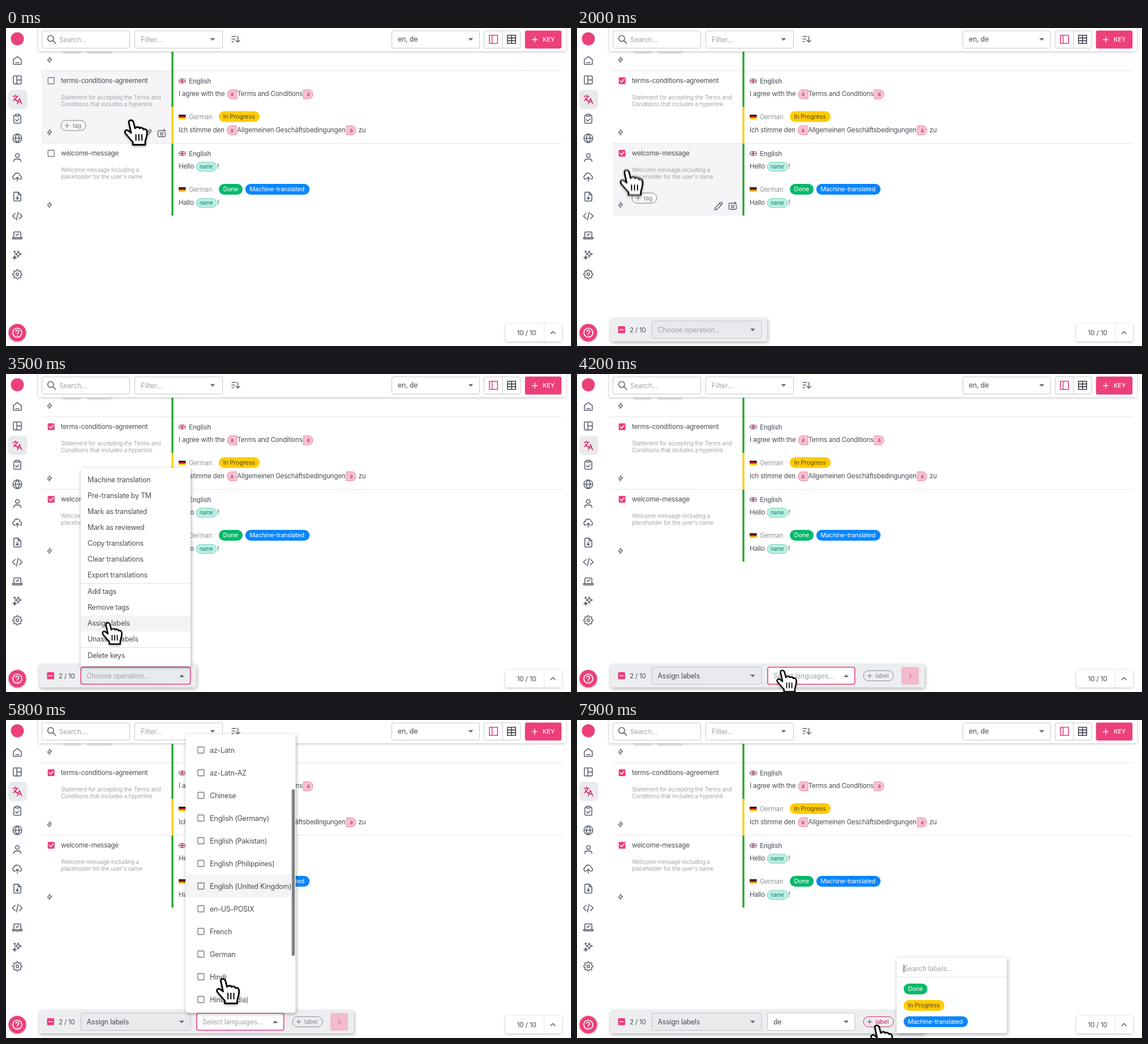
Recreate the animation shown at these times as an HTML page. Size 998 by 561 pixels, loop 8 s.

```html
<!DOCTYPE html>
<html lang="en">
<head>
<meta charset="utf-8">
<title>Assigning labels to translations</title>
<style>
  html, body { margin: 0; width: 100%; height: 100%; overflow: hidden; background: #fff; }
  svg { display: block; width: 998px; height: 561px; }
  text { font-family: Inter, "Liberation Sans", sans-serif; letter-spacing: -.018em; white-space: pre; }
  .paper { filter: drop-shadow(1px 2px 3px rgba(0,0,0,.33)); }
  .soft { filter: drop-shadow(0 1px 2px rgba(0,0,0,.25)); }
  .pointer { filter: drop-shadow(0 2px 2px rgba(0,0,0,.25)); }
</style>
</head>
<body>
<svg id="stage" viewBox="0 0 998 561"></svg>
<script>
const LOOP = 8000, STEP = 100;
const PINK = '#ec407a', INK = '#4a4d55', ICON = '#596070', FAINT = '#a1a4ab', EDGE = '#c4c6cb';

const clamp = v => Math.max(0, Math.min(1, v));
const ramp = (t, a, b) => clamp((t - a) / (b - a));
const ease = v => v * v * (3 - 2 * v);

// Drawing helpers; text is centred vertically on y.
const text = (x, y, s, size = 12.48, fill = INK, weight = 400) =>
  `<text x="${x}" y="${y + size * .36}" font-size="${size}" fill="${fill}" font-weight="${weight}">${s}</text>`;
const rect = (x, y, w, h, fill, r = 0, stroke = 'none', sw = 1) =>
  `<rect x="${x}" y="${y}" width="${w}" height="${h}" rx="${r}" fill="${fill}" stroke="${stroke}" stroke-width="${sw}"/>`;
const path = (d, stroke, sw = 1, fill = 'none') =>
  `<path d="${d}" fill="${fill}" stroke="${stroke}" stroke-width="${sw}" stroke-linecap="round" stroke-linejoin="round"/>`;
const at = (x, y, s, k = 1) => `<g transform="translate(${x} ${y}) scale(${k})">${s}</g>`;
const fade = (o, s) => o > 0 ? `<g opacity="${o}">${s}</g>` : '';
const group = (cls, s) => `<g class="${cls}">${s}</g>`;
// Icons are drawn on a 24 unit grid.
const icon = (x, y, d, color = ICON, k = .78, sw = 2) =>
  at(x, y, `<g transform="translate(-12 -12)">${path(d, color, sw)}</g>`, k);
const ring = (x, y, r) => `M${x - r} ${y}a${r} ${r} 0 1 0 ${2 * r} 0a${r} ${r} 0 1 0 ${-2 * r} 0`;
const caret = (x, y, up) => at(x, y, path('M-3.5-1.7h7L0 1.8z', '#62666f', .8, '#62666f'), up ? -1 : 1);
const plus = (x, y, r, color, sw = 1.2) => path(`M${x - r} ${y}h${2 * r}M${x} ${y - r}v${2 * r}`, color, sw);

const gear = (() => {
  let d = '';
  for (let i = 0; i < 72; i++) {
    const a = i * Math.PI / 36, r = 9.2 + 1.4 * Math.cos(8 * a);
    d += `${i ? 'L' : 'M'}${(12 + r * Math.cos(a)).toFixed(1)} ${(12 + r * Math.sin(a)).toFixed(1)}`;
  }
  return d + 'Z' + ring(12, 12, 3);
})();
const bolt = 'M13 3L5 14h6l-1 7 9-11h-6z';
const pencil = 'M3 21l1-5L16 4a2.800 2.800 0 0 1 4 4L8 20zM14 6l4 4';
const camera = 'M14 5H5a2 2 0 0 0-2 2v11a2 2 0 0 0 2 2h14a2 2 0 0 0 2-2v-8M18 2v6M15 5h6' + ring(12, 13, 3.2);
const grid = 'M3 3h18v18H3zM3 9h18M3 15h18M12 3v18';

const sideIcons = [
  'M3 10l9-7 9 7v10a1 1 0 0 1-1 1H4a1 1 0 0 1-1-1zM8 17h8',
  'M5 3h14a2 2 0 0 1 2 2v14a2 2 0 0 1-2 2H5a2 2 0 0 1-2-2V5a2 2 0 0 1 2-2zM11 3v18M11 12h10',
  'M2 5h12M8 2v3M11 5c-1 5-4 8-8 10M5 9c2 4 5 6 8 7M12 22l5-12 5 12M14 18h6',
  'M8 4H6a2 2 0 0 0-2 2v14a2 2 0 0 0 2 2h12a2 2 0 0 0 2-2V6a2 2 0 0 0-2-2h-2M8 2h8v4H8zM8 14l3 3 5-5',
  ring(12, 12, 10) + 'M2 12h20M12 2c6 6 6 14 0 20M12 2c-6 6-6 14 0 20',
  ring(12, 7, 4.3) + 'M4 21v-1c0-3 2-5 5-5h6c3 0 5 2 5 5v1',
  'M6 17a5 5 0 0 1-1-9.500a7 7 0 0 1 13.500 1a4.500 4.500 0 0 1 0 8.500M8 16l4-4 4 4M12 12v9',
  'M14 2H6a2 2 0 0 0-2 2v16a2 2 0 0 0 2 2h12a2 2 0 0 0 2-2V8zM14 2v6h6M12 11v7M9 15l3 3 3-3',
  'M7 6l-6 6 6 6M17 6l6 6-6 6M14 3l-4 18',
  'M4 17V6a2 2 0 0 1 2-2h12a2 2 0 0 1 2 2v11M1 17h22v1a2 2 0 0 1-2 2H3a2 2 0 0 1-2-2zM9 10l2 2 4-4',
  'M14 3l2 5 5 2-5 2-2 5-2-5-5-2 5-2zM6 14l1 3 3 1-3 1-1 3-1-3-3-1 3-1zM4 5h4M6 3v4',
  gear
];

function check(x, y, on) {
  return on
    ? rect(x - 6, y - 6, 12, 12, PINK, 1.5) + path(`M${x - 3.3} ${y}l2.500 2.600 4.400-5`, '#fff', 1.5)
    : rect(x - 5.5, y - 5.5, 11, 11, 'none', 1, '#737781', 1.3);
}
const pill = (x, y, w, fill, s, color = '#fff') =>
  rect(x, y - 9.5, w, 19, fill, 9.5) + text(x + 7.5, y, s, 10.9, color);
const chip = (x, y, w, s, color, size) =>
  rect(x, y - 9, w, 18, 'none', 9, color) + plus(x + 11, y, 4, color) + text(x + 21, y, s, size, color);
const done = (x, y) => pill(x, y, 42, '#04b96a', 'Done');
const progress = (x, y) => pill(x, y, 72, '#ffcb05', 'In Progress', '#5a4a10');
const machine = (x, y) => pill(x, y, 113.5, '#0b86fb', 'Machine-translated');

function sidebar() {
  return rect(4, 109, 33.5, 34, '#e9eaed', 7)
    + sideIcons.map((d, i) => icon(20, 57.3 + 34.3 * i, d, i === 2 ? '#d5265f' : ICON)).join('')
    + `<circle cx="20" cy="19" r="11.5" fill="${PINK}"/>`
    + group('soft', `<circle cx="20" cy="537.500" r="15.500" fill="${PINK}"/>`)
    + icon(20, 537.5, ring(12, 12, 9.5) + 'M9 9.500a3 3 0 1 1 4 3c-.7.300-1 .8-1 1.500M12 17v.1', '#fff', .84);
}

function header() {
  const box = (x, w) => rect(x, 5, w, 30.5, '#fff', 3, EDGE);
  return group('soft', rect(57, -5, 932, 46, '#fff'))
    + box(63.5, 155) + icon(80.5, 20, ring(10, 10, 6.5) + 'M15 15l6 6', ICON, .8)
    + text(94, 20.5, 'Search...', 12, FAINT)
    + box(227.5, 155) + text(238, 20.5, 'Filter...', 12.48, FAINT) + caret(365, 20)
    + path('M399 15h7M399 19.500h5M399 24h3M409.500 14.500v10M406 21.500l3.500 3.500 3.500-3.500', ICON, 1.5)
    + box(681.5, 155) + text(692, 20, 'en, de') + caret(821, 20)
    + box(844.5, 64.5) + path('M877 5v30', EDGE)
    + icon(861, 20, 'M3 3h18v18H3zM9 3v18', PINK, .8) + icon(893, 20, grid, '#3f434c', .8)
    + rect(916.7, 4.6, 64.5, 31.7, PINK, 3) + plus(934, 20.5, 4.5, '#fff', 1.4) + text(948, 20.5, 'KEY', 10.9, '#fff', 500);
}

const blade = (x, y, w, left) => {
  const r = 7, d = left
    ? `M${x + r} ${y - 8}h${w - r}v16h${r - w}a${r} 8 0 0 1 0-16z`
    : `M${x} ${y - 8}h${w - r}a${r} 8 0 0 1 0 16h${r - w}z`;
  return path(d, '#e28ba9', 1, '#f9bfd3') + text(x + 5.7, y, 'a', 9.4, '#8c3354');
};
const param = y => rect(336, y - 8, 36, 16, '#baf0e4', 8, '#72d1be') + text(342, y, 'name', 9.3, '#1d7a6b');
const british = y => at(305, y - 4, rect(0, 0, 12.5, 8, '#29397c')
  + `<path d="M0 0l12.500 8M0 8L12.500 0" stroke="#fff" stroke-width="1.800"/>`
  + `<path d="M6.250 0v8M0 4h12.500" stroke="#fff" stroke-width="3"/>`
  + `<path d="M6.250 0v8M0 4h12.500" stroke="#d3213a" stroke-width="1.600"/>`);
const german = y => ['#111', '#dd1111', '#ffce00'].map((c, i) => rect(305, y - 4 + 2.7 * i, 12.5, 2.8, c)).join('');
const english = y => british(y) + text(323, y, 'English', 11.5, '#72767f', 600);
const deutsch = y => german(y) + text(323, y, 'German', 11.3, '#8f939b');

function keyCell(y, name, lines, checked, hover) {
  return fade(hover, rect(63, y, 229, 127, '#f5f5f8')
      + chip(97, y + 96, 44, 'tag', '#7c8089', 10.3)
      + icon(250, y + 110, pencil, ICON, .74) + icon(275, y + 110, camera, ICON, .72))
    + check(79.7, y + 17, checked) + text(97, y + 16.5, name, 11.7)
    + lines.map((s, i) => text(97, y + 46 + 12.2 * i, s, 9.95, FAINT)).join('')
    + icon(77, y + 108, bolt, ICON, .55);
}

function rows(t) {
  const leave = 1 - ramp(t, 1200, 1400);
  const next = ramp(t, 1150, 1400) * (1 - ramp(t, 2000, 2200));
  const line = 11.6;
  return rect(98, 30, 36, 16, '#e8e9eb', 8) + rect(140, 30, 49, 16, '#e8e9eb', 8)
    + icon(77, 56, bolt, ICON, .55)
    + keyCell(76, 'terms-conditions-agreement',
        ['Statement for accepting the Terms and', 'Conditions that includes a hyperlink'], t >= 700, leave)
    + keyCell(204, 'welcome-message',
        ['Welcome message including a', 'placeholder for the user\'s name'], t >= 1600, next)
    + path('M63 75.500H982M63 203.500H982', '#e4e5e8')
    + rect(292.3, 42, 3.3, 97.5, '#25a32e') + rect(292.3, 139.5, 3.3, 64, '#ffcb05') + rect(292.3, 204, 3.3, 127, '#25a32e')
    + english(93.5) + text(305, 116, 'I agree with the', line) + blade(391, 117, 17, true)
    + text(408.5, 116, 'Terms and Conditions', line) + blade(525.5, 117, 16.5, false)
    + deutsch(157) + progress(376, 156.3)
    + text(305, 179.7, 'Ich stimme den', line) + blade(390.5, 180.5, 16.5, true)
    + text(408, 179.7, 'Allgemeinen Geschäftsbedingungen', line) + blade(601.5, 180.5, 16.5, false)
    + text(622.5, 179.7, 'zu', line)
    + english(221.5) + text(305, 244, 'Hello', line) + param(244.7) + text(373, 244, '!', line)
    + deutsch(285) + done(376, 284.5) + machine(422.7, 284.5)
    + text(305, 308, 'Hallo', line) + param(308.7) + text(373, 308, '!', line);
}

const counter = group('soft', rect(882, 522, 100, 31, '#fff', 3))
  + path('M950.500 522v31', '#e3e4e7') + text(902.5, 537.5, '10 / 10', 11.9)
  + path('M962 539.500l4-4 4 4', ICON, 1.5);

function select(x, w, s, placeholder, active, up, fill) {
  const sw = active ? 1.6 : 1;
  return rect(x + sw / 2, 516.5 + sw / 2, w - sw, 31.5 - sw, fill, 3, active ? PINK : '#bfc2c9', sw)
    + text(x + 11, 532.5, s, 12.4, placeholder ? FAINT : INK) + caret(x + w - 16, 532.5, up);
}

function bottomBar(t) {
  const two = t >= 1600, wide = t >= 3600, picking = t >= 4200 && t < 7200;
  const x = two ? 131.5 : 129.5, opOpen = t >= 2700 && t < 3600, chosen = t >= 6300;
  let s = group('paper', rect(59, 512.5, wide ? 555 : two ? 277 : 275, 40.5, '#eceef1', 3))
    + rect(72.5, 526, 12.5, 12.5, PINK, 1.5) + path('M75.700 532.300h6', '#fff', 1.5)
    + text(93, 532.5, (two ? 2 : 1) + ' / 10', 11.7)
    + select(x, 195, wide ? 'Assign labels' : 'Choose operation...', !wide, opOpen, opOpen, '#e8eaed');
  if (wide) s += select(336, 155.5, chosen ? 'de' : 'Select languages...', !chosen, picking, picking && !chosen, '#fff')
    + chip(506, 532.3, 53, 'label', t >= 7300 ? '#d5265f' : '#858992', 10.9)
    + rect(573, 517, 31, 31, '#f3b9cc', 3) + path('M587 528.500l3.800 3.800-3.800 3.800', '#d9779b', 1.3);
  return fade(ramp(t, 700, 900), s);
}

const operations = ['Machine translation', 'Pre-translate by TM', 'Mark as translated', 'Mark as reviewed',
  'Copy translations', 'Clear translations', 'Export translations', 'Add tags', 'Remove tags',
  'Assign labels', 'Unassign labels', 'Delete keys'];

function operationMenu(t, [, cy]) {
  const items = operations.map((s, i) => {
    const y = 187 + 28 * i + (i > 6) + (i > 10);
    return (Math.abs(cy - y) < 14 ? rect(132, y - 14, 194, 28, '#f2f3f5') : '') + text(144, y, s);
  }).join('');
  return fade(ramp(t, 2650, 2800) * (1 - ramp(t, 3500, 3650)),
    group('paper', rect(132, 166, 194, 349.5, '#fff', 2)) + items + path('M132 369.500h194M132 482.500h194', '#dfe0e3'));
}

const languages = ['Afrikaans', 'Albanian', 'Arabic', 'Azerbaijani', 'az-Latn', 'az-Latn-AZ', 'Chinese',
  'English (Germany)', 'English (Pakistan)', 'English (Philippines)', 'English (United Kingdom)', 'en-US-POSIX',
  'French', 'German', 'Hindi', 'Hindi (India)', 'Italian', 'Japanese', 'Polish', 'Spanish'];

function languageMenu(t, [cx, cy]) {
  const scroll = 158 * ease(ramp(t, 5000, 5600));
  // The hovered row only changes when the pointer moves, not while the list scrolls.
  const inside = cx < 511 && cy < 517;
  const hover = inside ? Math.round((cy - 51 + (t < 5850 ? 0 : scroll)) / 40) : -1;
  const items = languages.map((s, i) => {
    const y = 51 + 40 * i - scroll, on = s === 'German' && t >= 6300;
    const fill = on ? '#fdebf1' : i === hover ? '#f4f4f6' : '';
    return (fill ? rect(317, y - 20, 194, 40, fill) : '') + check(344.3, y, on) + text(360, y + .3, s);
  }).join('');
  const bar = ramp(t, 4900, 5100) * (1 - ramp(t, 6300, 6600));
  return fade(ramp(t, 4200, 4400) * (1 - ramp(t, 7100, 7300)),
    group('paper', rect(317, 25, 194.5, 491.5, '#fff', 3))
    + `<clipPath id="list">${rect(317, 25, 194.5, 491.5, '#fff', 3)}</clipPath><g clip-path="url(#list)">${items}</g>`
    + fade(bar, rect(504, 26, 7, 489, '#fff') + rect(504.7, 26.5 + scroll * .605, 5.5, 294, '#808080', 2.7)));
}

function labelPopover(t) {
  return fade(ramp(t, 7650, 7800),
    group('paper', rect(564.5, 419, 195, 133.5, '#fff', 3)) + path('M564.500 453.500h195', '#e3e4e7')
    + path('M577.300 432v13', '#333') + text(577, 438.8, 'Search labels...', 12.48, FAINT)
    + done(577, 474.5) + progress(577, 503.5) + machine(577, 532.3));
}

// Pointer: [time, x, y] stops, shapes by start time, and click times.
const stops = [[100, 221, 164], [600, 81, 94], [1000, 81, 94], [1400, 81, 230], [1900, 81, 230], [2500, 173.5, 533],
  [2950, 173.5, 533], [3350, 180, 440], [3650, 180, 440], [4050, 363, 524], [4500, 363, 524], [4900, 383.5, 458],
  [5850, 383.5, 458], [6100, 385, 413], [6500, 385, 413], [6950, 529, 541], [7900, 530, 540]];
const shapes = [[0, 'hand'], [2100, 'arrow'], [2500, 'beam'], [3000, 'hand'], [3700, 'arrow'], [4000, 'hand'],
  [6700, 'arrow'], [7200, 'hand']];
const clicks = [700, 1600, 2650, 3500, 4200, 6250, 7150, 7750];

function position(t) {
  const i = stops.findIndex(s => s[0] > t);
  if (i < 1) return (i ? stops[stops.length - 1] : stops[0]).slice(1);
  const [a, x, y] = stops[i - 1], [b, u, v] = stops[i], k = ease(ramp(t, a, b));
  return [x + (u - x) * k, y + (v - y) * k];
}

const beam = 'M-9-18c5 0 9 1 9 5c0-4 4-5 9-5M0-13V13M-9 18c5 0 9-1 9-5c0 4 4 5 9 5M-5 0H5';
const pointers = {
  hand: path('M-4 3C-5-2 2-3 4 2L7 13C9 10 14 10 15 13C17 11 21 12 22 15C25 13 28 16 28 19C29 26 26 31 25 36V42H3V37'
      + 'C-2 32-6 27-10 22C-13 18-8 14-4 18L0 21Z', '#000', 2.8, '#fff')
    + path('M8.500 24v10M13.700 24v10M19 24v10', '#000', 2),
  arrow: path('M0 0V26L6 20.500 10.500 31 15 29 10.500 18.500H19Z', '#fff', 2, '#000'),
  beam: path(beam, '#fff', 7) + path(beam, '#000', 3.4)
};

function pointer(t, [x, y]) {
  const shape = shapes.filter(s => s[0] <= t).pop()[1];
  const press = Math.max(...clicks.map(c => clamp(1 - Math.abs(t - c) / 250)));
  const [ax, ay] = position(t - 50), [bx, by] = position(t + 50);
  const blur = [bx - ax, by - ay].map(v => Math.abs(v) * .03);
  const body = at(x, y, pointers[shape], 1 - .13 * press);
  const still = blur[0] + blur[1] < .2;
  return `<filter id="blur" x="-50%" y="-50%" width="200%" height="200%"><feGaussianBlur stdDeviation="${blur.join(' ')}"/></filter>`
    + `<g ${still ? '' : 'filter="url(#blur)"'}>${group('pointer', body)}</g>`;
}

const stage = document.getElementById('stage');
const frameArt = header() + sidebar() + counter;
let shown = -1;

function draw(now) {
  const t = Math.floor(now % LOOP / STEP) * STEP;
  if (t !== shown) {
    shown = t;
    const p = position(t);
    stage.innerHTML = rows(t) + frameArt + bottomBar(t) + operationMenu(t, p) + languageMenu(t, p)
      + labelPopover(t) + pointer(t, p);
  }
  requestAnimationFrame(draw);
}
draw(performance.now());
</script>
</body>
</html>
```
